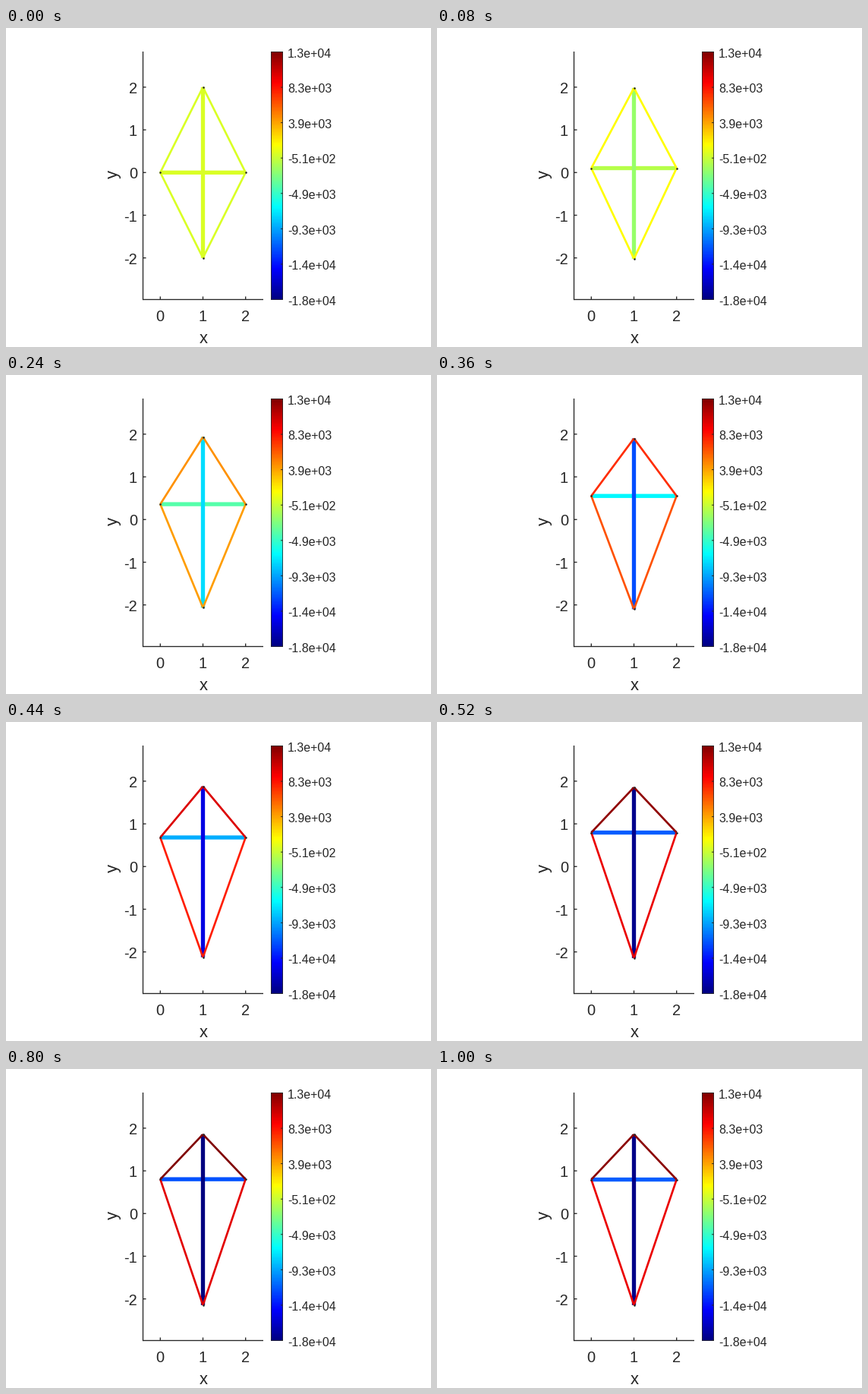
Animation of 560 by 420 pixels, one loop 1020 ms. Source, as a matplotlib script:

```python
import numpy as np
import matplotlib.pyplot as plt
from matplotlib.animation import FuncAnimation
from matplotlib.patches import Rectangle

W, H, DPI = 560, 420, 100
FRAMES, STEP = 51, 20
PX = 72 / DPI
INK = (0.15, 0.15, 0.15)
X0, Y0, UNIT = 203.3, 190.3, 56.2
LOW, HIGH = -18110.0, 12690.0
STRUT, CABLE, AXIS = 5.33, 2.67, 1.33

plt.rcParams["font.family"] = "Liberation Sans"


def jet(f):
    """Classic jet ramp with 256 levels."""
    f = np.floor(np.clip(f, 0, 1) * 255.999) / 255
    rgb = [1.5 - np.abs(4 * f - c) for c in (3, 2, 1)]
    return np.clip(np.stack(rgb, axis=-1), 0, 1)


def force_color(force):
    return tuple(jet(np.float64((force - LOW) / (HIGH - LOW))))


def to_px(p):
    return X0 + UNIT * p[0], Y0 - UNIT * p[1]


fig = plt.figure(figsize=(W / DPI, H / DPI), dpi=DPI, facecolor="white")
ax = fig.add_axes([0, 0, 1, 1])
ax.axis("off")


def line(xs, ys, width=AXIS, z=3):
    return ax.plot(xs, ys, color=INK, lw=width * PX, zorder=z,
                   solid_capstyle="butt", snap=False)[0]


def label(x, y, text, size, **kw):
    kw = {"ha": "center", "va": "baseline", **kw}
    ax.text(x, y, text, fontsize=size * PX, color=INK, **kw)


# Axes
LEFT, RIGHT, TOP, BOTTOM = 180.5, 339, 31, 357.5
line([LEFT, LEFT], [TOP, BOTTOM + AXIS / 2])
line([LEFT, RIGHT], [BOTTOM, BOTTOM])
for v in range(-2, 3):
    y = Y0 - UNIT * v
    line([LEFT, LEFT + 4], [y, y])
    label(173, y + 8.1, str(v), 20, ha="right")
for v in range(3):
    x = X0 + UNIT * v
    line([x, x], [BOTTOM, BOTTOM - 4])
    label(x - 0.3, 386, str(v), 20)
label(260, 415, "x", 22)
label(141.3, 193, "y", 22, rotation=90, va="center")

# Colour bar
L, R, T, B = 349, 365, 31, 358
ax.imshow(jet(np.linspace(1, 0, 256))[:, None, :], aspect="auto",
          extent=(L, R, B, T), interpolation="nearest", zorder=1)
ax.add_patch(Rectangle((L + 0.5, T + 0.5), R - L - 1, B - T - 1, fill=False,
                       ec=INK, lw=0.8 * PX, snap=False, zorder=2))
names = ["1.3e+04", "8.3e+03", "3.9e+03", "-5.1e+02",
         "-4.9e+03", "-9.3e+03", "-1.4e+04", "-1.8e+04"]
for y, name in zip(np.linspace(T + 0.5, B - 0.5, len(names)), names):
    line([R - 3, R], [y, y], 1)
    label(371, y + 7.25, name, 16, ha="left")
ax.set_xlim(0, W)
ax.set_ylim(H, 0)

# Truss: two struts, four cables; nodes are left, right, top, bottom
MEMBERS = [(0, 1), (2, 3), (0, 2), (1, 2), (0, 3), (1, 3)]
members = [line([], [], STRUT if i < 2 else CABLE, z=4 + 0.1 * i)
           for i in range(len(MEMBERS))]
dots = ax.plot([], [], "o", ms=2.6 * PX, color=INK, mew=0, zorder=6,
               snap=False)[0]


def pose(n):
    """Cable pull ramps up with a short lag, then rings slightly."""
    lagged = n - 0.8 * (1 - np.exp(-n / 0.8))
    p = min(lagged / 24.9, 1.0)
    ring = -np.cos(2 * np.pi * (n - 27) / 25) if n > 25 else 0.0
    mid = 0.8 * p + 0.004 * ring
    top = 2 - 0.145 * p
    nodes = [(0, mid), (2, mid), (1, top), (1, top - 4)]
    # Static balance gives the cable and cross-strut forces
    push = p * (15800 + 2200 * p) * (1 + 0.015 * ring)
    up, down = top - mid, mid - top + 4
    t_up = push / 2 * np.hypot(1, up) / up
    t_down = push / 2 * np.hypot(1, down) / down
    across = push / 2 * (1 / up + 1 / down)
    return nodes, [-across, -push, t_up, t_up, t_down, t_down]


def draw(n):
    nodes, forces = pose(n)
    pts = [to_px(p) for p in nodes]
    for art, (a, b), force in zip(members, MEMBERS, forces):
        art.set_data(*zip(pts[a], pts[b]))
        art.set_color(force_color(force))
    dots.set_data(*zip(*pts))
    return [*members, dots]


anim = FuncAnimation(fig, draw, frames=FRAMES, interval=STEP,
                     repeat=True, repeat_delay=0, blit=False)
plt.show()
```
